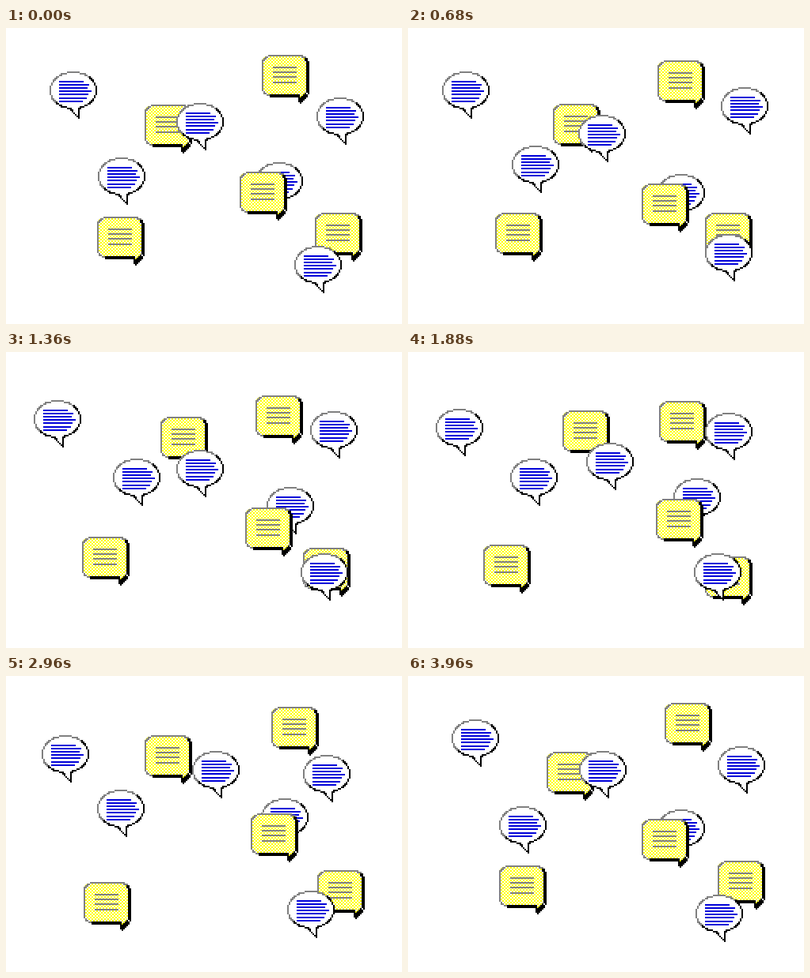
An HTML page with a canvas for the animation above (4 s loop, 500 by 375 pixels).

```html
<!DOCTYPE html>
<html lang="en">
<head>
<meta charset="utf-8">
<title>Drifting speech bubbles</title>
<style>
html, body { margin: 0; width: 100%; height: 100%; overflow: hidden; background: #fff; }
canvas { display: block; }
</style>
</head>
<body>
<canvas id="stage" width="500" height="375"></canvas>
<script>
const LOOP = 4000, STEPS = 85;
const stage = document.getElementById('stage').getContext('2d');

function makeSprite(draw) {
  const canvas = document.createElement('canvas');
  canvas.width = canvas.height = 66;
  draw(canvas.getContext('2d'));
  return canvas;
}

// Coarse pixel line: 2px blocks on a 2px grid.
function line(g, color, points) {
  g.fillStyle = color;
  for (let i = 1; i < points.length; i++) {
    const [ax, ay] = points[i - 1], [bx, by] = points[i];
    const n = Math.max(1, Math.ceil(Math.hypot(bx - ax, by - ay)));
    for (let k = 0; k <= n; k++) {
      const x = ax + (bx - ax) * k / n, y = ay + (by - ay) * k / n;
      g.fillRect(2 * Math.round(x / 2), 2 * Math.round(y / 2), 2, 2);
    }
  }
}

function fill(g, color, points) {
  g.fillStyle = color;
  g.beginPath();
  points.forEach(p => g.lineTo(...p));
  g.fill();
}

function arc(from, to) {
  const points = [];
  for (let a = from; a <= to; a += 3) {
    const r = a * Math.PI / 180;
    points.push([29 + 29 * Math.cos(r), 23 + 23 * Math.sin(r)]);
  }
  return points;
}

const whiteBubble = makeSprite(g => {
  const tail = [[26, 46], [28, 50], [36, 58], [36, 46]];
  fill(g, '#fff', arc(0, 360).map(([x, y]) => [x + 1, y + 1]));
  line(g, '#000', arc(-48, 76));
  line(g, '#000', arc(95, 142));
  line(g, '#808080', arc(142, 312));
  fill(g, '#fff', tail);
  line(g, '#000', tail);
  g.fillStyle = '#fff';
  g.fillRect(28, 44, 8, 4);
  g.fillStyle = '#0000d8';
  [31, 38, 36, 41, 37, 35, 30].forEach((w, i) => g.fillRect(12, 12 + Math.round(i * 4.1), w, 2));
});

const yellowBubble = makeSprite(g => {
  const checker = makeSprite(c => {
    c.fillStyle = '#fff';
    c.fillRect(0, 0, 66, 66);
    c.fillStyle = '#ff0';
    for (let y = 0; y < 33; y++)
      for (let x = y % 2; x < 33; x += 2) c.fillRect(2 * x, 2 * y, 2, 2);
  });
  const upperLeft = [[8, 50], [2, 48], [0, 42], [0, 8], [2, 4], [8, 0], [48, 0], [53, 2]];
  const lowerRight = [[53, 2], [56, 8], [56, 44], [54, 49], [46, 57], [46, 50], [8, 50]];
  const outline = upperLeft.concat(lowerRight);
  line(g, '#000', lowerRight.map(([x, y]) => [x + 2, y + 2]));
  fill(g, g.createPattern(checker, 'repeat'), outline);
  line(g, '#000', lowerRight);
  line(g, '#808080', upperLeft);
  g.fillStyle = '#808080';
  [15, 21, 27, 34].forEach(y => g.fillRect(14, y, 30, 2));
});

// Sprite, left and top of the circuit, steps already walked; back to front.
const bubbles = [
  [whiteBubble, 315, 155, 35],
  [yellowBubble, 315, 34, 12],
  [yellowBubble, 175, 74, 43],
  [yellowBubble, 295, 174, 28],
  [yellowBubble, 95, 234, 75],
  [yellowBubble, 375, 234, 5],
  [whiteBubble, 35, 55, 82],
  [whiteBubble, 215, 95, 20],
  [whiteBubble, 115, 135, 51],
  [whiteBubble, 375, 75, 67],
  [whiteBubble, 355, 255, 59]
];

// Left 20, down 30, diagonally up 20, up 10, then a short rest.
function circuit(s) {
  if (s < 20) return [20 - s, 0];
  if (s < 50) return [0, s - 20];
  if (s < 70) return [s - 50, 80 - s];
  return [20, Math.max(0, 80 - s)];
}

function render(now) {
  let t = Math.floor(now % LOOP / 40) * 40;
  if (t > 3400 && t < 3560) t = 3400;
  const step = Math.floor(t / LOOP * STEPS + 0.69);
  stage.fillStyle = '#fff';
  stage.fillRect(0, 0, 500, 375);
  for (const [sprite, left, top, phase] of bubbles) {
    const [x, y] = circuit((step + phase) % STEPS);
    stage.drawImage(sprite, left + x, top + y);
  }
}

const start = performance.now();
function tick() {
  render(performance.now() - start);
  requestAnimationFrame(tick);
}
tick();
</script>
</body>
</html>
```
